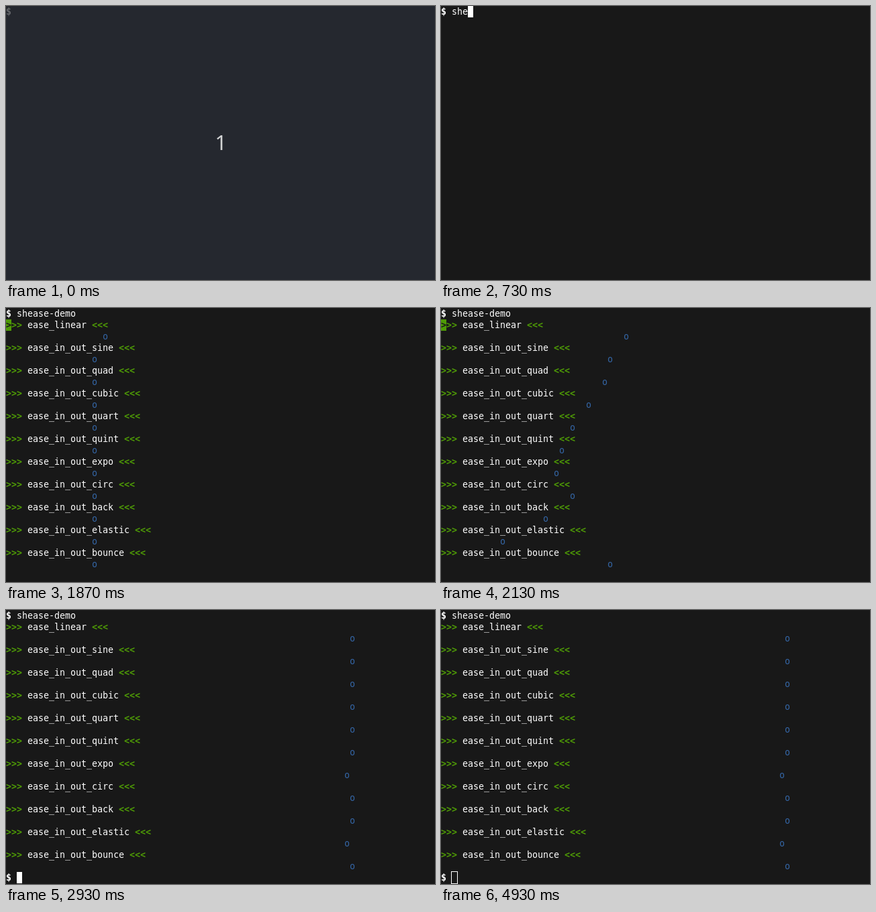
An HTML page for the animation above (5.03 s loop, 639 by 409 pixels).

```html
<!DOCTYPE html>
<html lang="en">
<head>
<meta charset="utf-8">
<title>Easing in the terminal</title>
<style>
  html, body { margin: 0; width: 100%; height: 100%; overflow: hidden; background: #181818; }
  svg { display: block; width: 639px; height: 409px; }
  text { font: 13.29px "DejaVu Sans Mono", monospace; fill: #fff; white-space: pre; }
  .bold { font-weight: bold; }
  .green { fill: #4e9a06; }
  .blue { fill: #3465a4; }
  #count { font: 31px "Noto Sans", "Open Sans", sans-serif; fill: #d2d3d4; text-anchor: middle; }
</style>
</head>
<body>
<svg id="stage" viewBox="0 0 639 409" xmlns="http://www.w3.org/2000/svg"></svg>
<script>
const LOOP = 5030, CW = 8, CH = 17, BG = "#181818";
const CMD = "shease-demo";
const keyTimes = [530, 670, 730, 870, 1100, 1160, 1230, 1370, 1430, 1500, 1570];
const ENTER = 1770, OUTPUT = 1830, DONE = 2630;
// moments at which the terminal repaints while the demo runs
const repaints = [1830, 1900, 1970, 2030, 2070, 2100, 2130, 2170, 2230, 2270, 2300, 2330,
  2370, 2400, 2430, 2470, 2500, 2530, 2570, 2600];
// [time, progress]: the script speeds up a little on the way
const pace = [[1790, 0], [2130, .39], [2270, .54], [2470, .845], [2600, 1]];
const blinks = [[330, 2370], [2930, 3570], [4100, 4700]];

const { pow, sin, cos, sqrt, PI } = Math;
const power = n => t => t < .5 ? pow(2 * t, n) / 2 : 1 - pow(2 - 2 * t, n) / 2;
const bounceOut = x => {
  const n = 7.5625, d = 2.75;
  if (x < 1 / d) return n * x * x;
  if (x < 2 / d) return n * pow(x - 1.5 / d, 2) + .75;
  if (x < 2.5 / d) return n * pow(x - 2.25 / d, 2) + .9375;
  return n * pow(x - 2.625 / d, 2) + .984375;
};
const eases = {
  linear: t => t,
  in_out_sine: t => (1 - cos(PI * t)) / 2,
  in_out_quad: power(2),
  in_out_cubic: power(3),
  in_out_quart: power(4),
  in_out_quint: power(5),
  in_out_expo: t => t < .5 ? pow(2, 20 * t - 10) / 2 : 1 - pow(2, 10 - 20 * t) / 2,
  in_out_circ: t => t < .5 ? (1 - sqrt(1 - 4 * t * t)) / 2 : (1 + sqrt(1 - pow(2 - 2 * t, 2))) / 2,
  in_out_back: t => {
    const s = 1.70158 * 1.525, u = t < .5 ? 2 * t : 2 * t - 2;
    return t < .5 ? u * u * ((s + 1) * u - s) / 2 : (u * u * ((s + 1) * u + s) + 2) / 2;
  },
  in_out_elastic: t => {
    const w = sin((20 * t - 11.125) * 2 * PI / 4.5);
    return t < .5 ? -pow(2, 20 * t - 10) * w / 2 : 1 + pow(2, 10 - 20 * t) * w / 2;
  },
  in_out_bounce: t => t < .5 ? (1 - bounceOut(1 - 2 * t)) / 2 : (1 + bounceOut(2 * t - 1)) / 2
};

const stage = document.getElementById("stage");
function add(tag, attrs, parent = stage) {
  const el = document.createElementNS("http://www.w3.org/2000/svg", tag);
  for (const k in attrs) el.setAttribute(k, attrs[k]);
  return parent.appendChild(el);
}
function write(str, col, row, cls = "", parent = stage) {
  const el = add("text", { x: col * CW, y: row * CH + 13, class: cls }, parent);
  el.textContent = str;
  return el;
}
const show = (el, on) => el.setAttribute("visibility", on ? "visible" : "hidden");

const back = add("rect", { width: 639, height: 409 });
const prompt = write("$", 0, 0, "bold");
const typed = write("", 2, 0);
const output = add("g", {});
const dots = Object.keys(eases).map((name, i) => {
  const row = 1 + 2 * i, label = "ease_" + name;
  write(">>>", 0, row, "bold green", output);
  write(label, 4, row, "", output);
  write("<<<", 5 + label.length, row, "bold green", output);
  return { ease: eases[name], el: write("o", 16, row + 1, "blue", output) };
});
const endPrompt = write("$", 0, 23, "bold");
const cursor = add("rect", { width: CW, height: CH });
const under = write(">", 0, 1, "bold");
under.style.fill = BG;
const hollow = add("rect", { x: 15.5, y: 390.5, width: 9, height: 18, fill: "none", stroke: "#fff" });
const count = add("text", { id: "count", x: 320, y: 215 });
count.textContent = "1";

function progress(ms) {
  const now = repaints.filter(r => r <= ms).pop() || 0;
  if (now <= pace[0][0]) return 0;
  for (let i = 1; i < pace.length; i++) {
    const [t0, p0] = pace[i - 1], [t1, p1] = pace[i];
    if (now < t1) return p0 + (p1 - p0) * (now - t0) / (t1 - t0);
  }
  return 1;
}

function draw(ms) {
  const intro = ms < 70, printed = ms >= OUTPUT, done = ms >= DONE;
  back.setAttribute("fill", intro ? "#25282f" : BG);
  prompt.style.fill = intro ? "#66686c" : "#fff";
  show(count, intro);

  const n = keyTimes.filter(k => k <= ms).length;
  typed.textContent = CMD.slice(0, n);

  show(output, printed);
  const p = progress(ms);
  for (const { ease, el } of dots)
    el.setAttribute("x", (16 + Math.trunc(48 * ease(p) + 1e-9)) * CW);

  show(endPrompt, done);
  const lit = blinks.some(([a, b]) => ms >= a && ms < b);
  const [col, row] = done ? [2, 23] : ms >= ENTER ? [0, 1] : [2 + n, 0];
  cursor.setAttribute("x", col * CW);
  cursor.setAttribute("y", row * CH);
  cursor.setAttribute("fill", printed && !done ? "#4e9a06" : "#fff");
  show(cursor, lit);
  show(under, lit && printed && !done);
  show(hollow, ms >= 4930);
}

let start;
function tick(now) {
  if (start === undefined) start = now;
  draw((now - start) % LOOP);
  requestAnimationFrame(tick);
}
draw(0);
requestAnimationFrame(tick);
</script>
</body>
</html>
```
